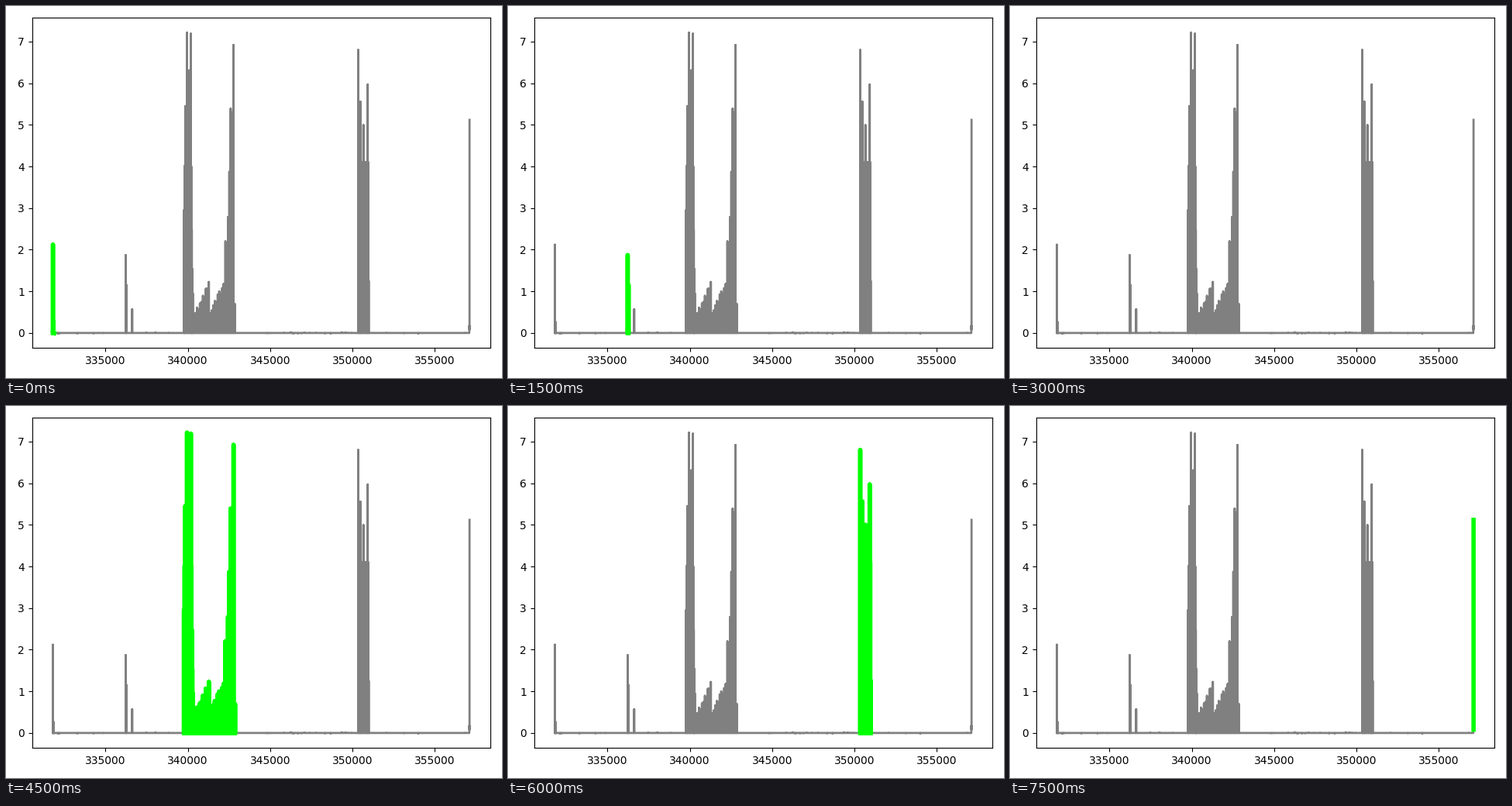
Recreate the animation shown at these times as a matplotlib script. Size 640x480 px, loop 9000 ms.

```python
import matplotlib.pyplot as plt
import numpy as np
from matplotlib.animation import FuncAnimation

STEP_MS = 1500
rng = np.random.default_rng(4)


def spikes(pairs):
    """Polyline that jumps from zero to each (x, height) and back."""
    return [(x, y) for x, h in sorted(pairs) for y in (0, h, 0)]


def ramp(x0, h0, x1, h1, n):
    """Heights growing or falling by a constant factor."""
    return list(zip(np.linspace(x0, x1, n), np.geomspace(h0, h1, n)))


def quiet(start, stop):
    """Flat stretch with rare tiny ripples."""
    x = np.arange(start, stop, 0.02)
    y = 0.01 * rng.normal(size=x.size) * (rng.random(x.size) < 0.04)
    return list(zip(x, y))


def valley(start, stop, period=0.9):
    """Low ragged spikes that swell twice, like a saw tooth."""
    x = np.arange(start, stop, 0.09)
    swell = (x - start) / period % 1
    return list(zip(x, (0.45 + 0.8 * swell) * rng.uniform(0.8, 1, x.size)))


# x in thousands
first_burst = (
    ramp(339.77, 2.95, 339.85, 5.45, 3)
    + [(339.955, 7.215), (340.04, 6.1), (340.10, 6.31), (340.191, 7.19)]
    + ramp(340.214, 4.0, 340.308, 0.95, 4)
    + valley(340.38, 342.22)
    + [(342.285, 2.2)]
    + ramp(342.36, 2.0, 342.605, 5.39, 4)
    + [(342.685, 5.3), (342.779, 6.92), (342.873, 0.69)]
)
second_burst = (
    ramp(350.36, 4.1, 350.95, 4.1, 9)
    + [(350.346, 6.8), (350.473, 5.56), (350.66, 5.0), (350.92, 5.97),
       (350.981, 1.25)]
)

signal = np.array(
    [(331.815, 0)]
    + spikes([(331.82, 2.12), (331.845, 0.27)])
    + quiet(331.9, 336.2)
    + spikes([(336.233, 1.87), (336.285, 1.15)])
    + quiet(336.32, 336.6)
    + spikes([(336.628, 0.57)])
    + quiet(336.7, 339.7)
    + spikes(first_burst)
    + quiet(342.91, 350.3)
    + spikes(second_burst)
    + quiet(351.01, 357.05)
    + [(357.085, 0), (357.09, 0.18), (357.1, 0.08), (357.1, 5.12)]
)
signal[:, 0] *= 1000

# one marked range of x per step, the third step marks nothing
ranges = [(331810, 331900), (336210, 336310), (0, 0),
          (339720, 342900), (350310, 351000), (357095, 357200)]

fig, ax = plt.subplots(figsize=(6.4, 4.8), dpi=100)
ax.plot(*signal.T, color="gray", lw=2, snap=False)
ax.set_ylim(-0.361, 7.576)
fig.tight_layout()
ax.autoscale(False)
marker, = ax.plot([], [], color="lime", lw=4, snap=False)


def draw(i):
    lo, hi = ranges[i]
    x = signal[:, 0]
    marker.set_data(*signal[(x >= lo) & (x <= hi)].T)
    return marker,


anim = FuncAnimation(fig, draw, frames=len(ranges), interval=STEP_MS,
                     repeat=True, repeat_delay=0)
plt.show()
```
